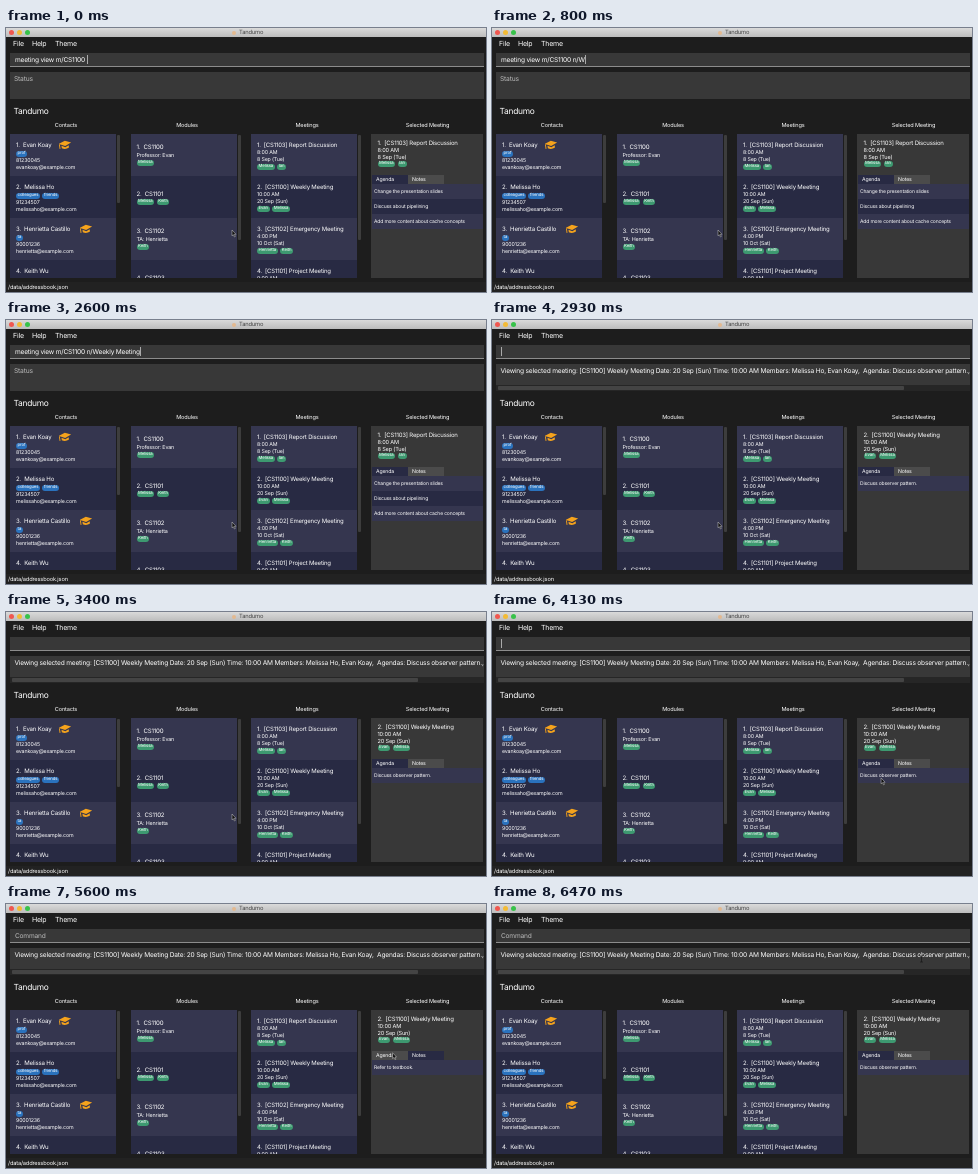
An HTML page that plays this animation: 480x264 px, repeating every 6990 ms.

```html
<!DOCTYPE html>
<html lang="en">
<head>
<meta charset="utf-8">
<title>Tandumo</title>
<style>
html, body { margin: 0; width: 100%; height: 100%; overflow: hidden; background: #1d1d1d; }
#stage { position: relative; width: 480px; height: 264px; overflow: hidden; color: #fff;
  font-family: Inter, "Liberation Sans", sans-serif; text-rendering: geometricPrecision; }
#stage div { position: absolute; }
.t { line-height: 0; white-space: pre; width: max-content; letter-spacing: -.03em; }
.tag { height: 6px; line-height: 6px; padding: 0 1.6px; margin-right: 2.5px; border-radius: 3px; float: left;
  font-size: 4.3px; letter-spacing: -.03em; }
.clip { overflow: hidden; }
#caret { width: 1px; height: 9px; top: 27px; background: #aaa; }
svg { position: absolute; left: 0; top: 0; }
</style>
</head>
<body>
<div id="stage"></div>
<script>
const LOOP = 6990, GREEN = '#3d9970', BLUE = '#2a72bd';
const ROWS = ['#35364f', '#282a43'];

const box = (x, y, w, h, fill, style = '', inner = '') =>
  `<div style="left:${x}px;top:${y}px;width:${w}px;height:${h}px;background:${fill};${style}">${inner}</div>`;
const text = (x, y, size, s, style = '') =>
  `<div class="t" style="left:${x}px;top:${y}px;font-size:${size}px;${style}">${s}</div>`;
const center = (x, y, size, s) => text(x, y, size, s, 'transform:translateX(-50%)');
const tags = (x, y, names, fill) => `<div class="t" style="left:${x}px;top:${y - 3}px">` +
  names.map(n => `<span class="tag" style="background:${fill}">${n}</span>`).join('') + '</div>';
const dot = (x, y, d, fill) => box(x - d / 2, y - d / 2, d, d, fill, 'border-radius:50%');
const cap = (x, y) => `<svg width="14" height="10" viewBox="0 0 14 10" style="left:${x}px;top:${y}px">
  <path transform="rotate(-8 6 5)" fill="#f5a31c"
    d="M12.4 3.5 6.4.8 0 3 6 6zM9.6 5.7 6 7.2 2.4 5.2V7.8Q6 10 9.6 8zM.1 3.6H1V8.2H.1z"/></svg>`;

// Lists share one row pitch; each row builds its own content.
function list(x, thumb, rows, build) {
  const cells = rows.map((r, i) => box(0, i * 42, 106, 42, ROWS[i % 2], '', build(r, i + 1))).join('');
  return `<div class="clip" style="left:${x}px;top:106px;width:106px;height:144px">${cells}</div>` +
    box(x + 107, 107, 3, thumb, '#3d3d3d', 'border-radius:1px');
}

const contacts = [
  ['Evan Koay', ['prof'], '81230045', 'evankoay@example.com', 49],
  ['Melissa Ho', ['colleagues', 'friends'], '91234507', 'melissaho@example.com'],
  ['Henrietta Castillo', ['ta'], '90001236', 'henrietta@example.com', 70],
  ['Keith Wu', [], '', '']
];
const modules = [
  ['CS1100', 'Professor: Evan', ['Melissa']],
  ['CS1101', '', ['Melissa', 'Keith']],
  ['CS1102', 'TA: Henrietta', ['Keith']],
  ['CS1103', '', []]
];
const meetings = [
  ['[CS1103] Report Discussion', '8:00 AM', '8 Sep (Tue)', ['Melissa', 'Ian']],
  ['[CS1100] Weekly Meeting', '10:00 AM', '20 Sep (Sun)', ['Evan', 'Melissa']],
  ['[CS1102] Emergency Meeting', '4:00 PM', '10 Oct (Sat)', ['Henrietta', 'Keith']],
  ['[CS1101] Project Meeting', '9:00 AM', '12 Oct (Mon)', []]
];

const contactRow = ([name, labels, phone, mail, capX], n) =>
  text(6, 11.7, 6.1, `${n}.  ${name}`) + tags(6, 20, labels, BLUE) +
  text(6, 27, 5.3, phone) + text(6, 34, 5.3, mail) + (capX ? cap(capX, 5.5) : '');
function moduleRow([code, lead, names], n) {
  const y = lead ? 14.3 : 18.5;
  return text(6, y, 6.1, `${n}.  ${code}`) + text(6, y + 7.5, 5.4, lead) +
    tags(6, lead ? 29 : 26, names, GREEN);
}
const meetingRow = ([name, time, day, names], n) =>
  text(6, 11.8, 6, `${n}.  ${name}`) + text(6, 19, 5.3, time) +
  text(6, 26, 5.3, day) + tags(6, 32.5, names, GREEN);

const frame =
  box(0, 0, 480, 9, 'linear-gradient(#dadada, #bcbcbc)') +
  dot(5, 4.5, 5, '#f0574f') + dot(13, 4.5, 5, '#f3bb35') + dot(21, 4.5, 5, '#38c24a') +
  dot(228, 4.5, 4, '#e3b98f') + text(233, 4.7, 5.8, 'Tandumo', 'color:#444') +
  text(7, 15.5, 7, 'File') + text(26, 15.5, 7, 'Help') + text(49, 15.5, 7, 'Theme') +
  box(4, 25, 474, 14, '#383838', 'box-sizing:border-box;border-bottom:1px solid #8c8c8c') +
  box(4, 44, 474, 27, '#383838') +
  text(7.5, 84.4, 8.4, 'Tandumo') +
  center(60, 98.3, 5.6, 'Contacts') + center(181, 98.3, 5.6, 'Modules') +
  center(301, 98.3, 5.6, 'Meetings') + center(421.5, 98.3, 5.6, 'Selected Meeting') +
  list(4, 68, contacts, contactRow) + list(124.5, 105, modules, moduleRow) +
  list(245, 105, meetings, meetingRow) +
  box(365, 106, 112, 144, '#383838') +
  box(0, 254, 480, 10, '#222') + text(2, 259.7, 5.7, '/data/addressbook.json');

const result = 'Viewing selected meeting: [CS1100] Weekly Meeting Date: 20 Sep (Sun) Time: 10:00 AM ' +
  'Members: Melissa Ho, Evan Koay,  Agendas: Discuss observer pattern.,  Notes: Refer to textbook.';
const status = [
  text(8, 50.5, 6.7, 'Status', 'color:#bbb'),
  `<div class="clip" style="left:4px;top:44px;width:474px;height:22px">${text(4.5, 6.5, 6.6, result)}</div>` +
  box(4, 65, 474, 6, '#262626') + box(6, 66, 406, 4, '#444', 'border-radius:1px')
];

// Selected meeting panel: index in the list, open tab, and the items under it.
function panel(i, tab, items) {
  const [name, time, day, names] = meetings[i];
  const tabs = ['Agenda', 'Notes'].map((s, k) =>
    box(366 + k * 36, 146.5, 36, 9.5, k === tab ? ROWS[1] : '#4b4b4b', '', text(4, 5, 5.2, s)));
  const rows = items.map((s, k) => box(366, 156 + k * 15, 111, 15, ROWS[k % 2], '', text(2, 7.5, 5, s)));
  return text(371.5, 115.8, 6, `${i + 1}.  ${name}`) + text(371.5, 123, 5.6, time) +
    text(371.5, 129.5, 5.6, day) + tags(371.5, 135.5, names, GREEN) + tabs.join('') + rows.join('');
}
const panels = {
  first: panel(0, 0, ['Change the presentation slides', 'Discuss about pipelining', 'Add more content about cache concepts']),
  agenda: panel(1, 0, ['Discuss observer pattern.']),
  notes: panel(1, 1, ['Refer to textbook.'])
};

const typed = 'n/Weekly Meeting';
const keyTimes = [270, 470, 730, 870, 1070, 1130, 1270, 1330, 1600, 2070, 2130, 2270, 2330, 2470, 2530, 2600];
const ENTER = 2930, NOTES = 4800, AGENDA = 6130;

// Pointer path: time, x, y
const path = [[3600, 226, 202], [3930, 365, 177], [4130, 389, 166], [4330, 406, 153], [4600, 417.5, 148],
  [5070, 417.5, 148], [5400, 397, 148], [5670, 383, 149], [6200, 383, 149], [6470, 428, 52]];
function pointer(t) {
  const i = path.findIndex(p => p[0] > t);
  if (i < 0) return path[path.length - 1].slice(1);
  if (!i) return path[0].slice(1);
  const [a, b] = [path[i - 1], path[i]], k = (t - a[0]) / (b[0] - a[0]);
  return [a[1] + (b[1] - a[1]) * k, a[2] + (b[2] - a[2]) * k];
}

const stage = document.getElementById('stage');
stage.innerHTML = frame + '<div id="status"></div><div id="panel"></div>' +
  '<div id="line" class="t" style="left:9px;top:32px;font-size:6.6px"></div><div id="caret"></div>' +
  `<svg id="mouse" width="8" height="10" viewBox="-1 -1 8 10">
    <path id="arrow" d="M0 0V5.8L1.4 4.7 2.4 6.9 3.3 6.5 2.4 4.3H4z" fill="#111" stroke="#ccc" stroke-width=".5"/>
    <path id="beam" d="M0 0H3M1.5 0V6M0 6H3" fill="none" stroke="#111" stroke-width=".6"/></svg>`;
const $ = id => document.getElementById(id);

function set(id, html) {
  const el = $(id);
  if (el.shown !== html) el.innerHTML = el.shown = html;
}
function draw(now) {
  const t = now % LOOP, sent = t >= ENTER, prompt = t >= NOTES;
  const count = keyTimes.filter(k => k <= t).length;
  set('line', prompt ? 'Command' : sent ? '' : 'meeting view m/CS1100 ' + typed.slice(0, count));
  $('line').style.color = prompt ? '#bbb' : '#fff';
  $('caret').style.left = 9 + $('line').getBoundingClientRect().width + 'px';
  $('caret').hidden = prompt || sent && (t - ENTER) % 970 >= 470;
  set('status', status[+sent]);
  set('panel', !sent ? panels.first : t >= NOTES && t < AGENDA ? panels.notes : panels.agenda);
  const [x, y] = pointer(t), beam = y < 71;
  $('mouse').style.transform = `translate(${x - 1}px,${y - 1}px)`;
  $('arrow').style.display = beam ? 'none' : '';
  $('beam').style.display = beam ? '' : 'none';
}
const start = performance.now();
(function tick() {
  draw(performance.now() - start);
  requestAnimationFrame(tick);
})();
</script>
</body>
</html>
```
